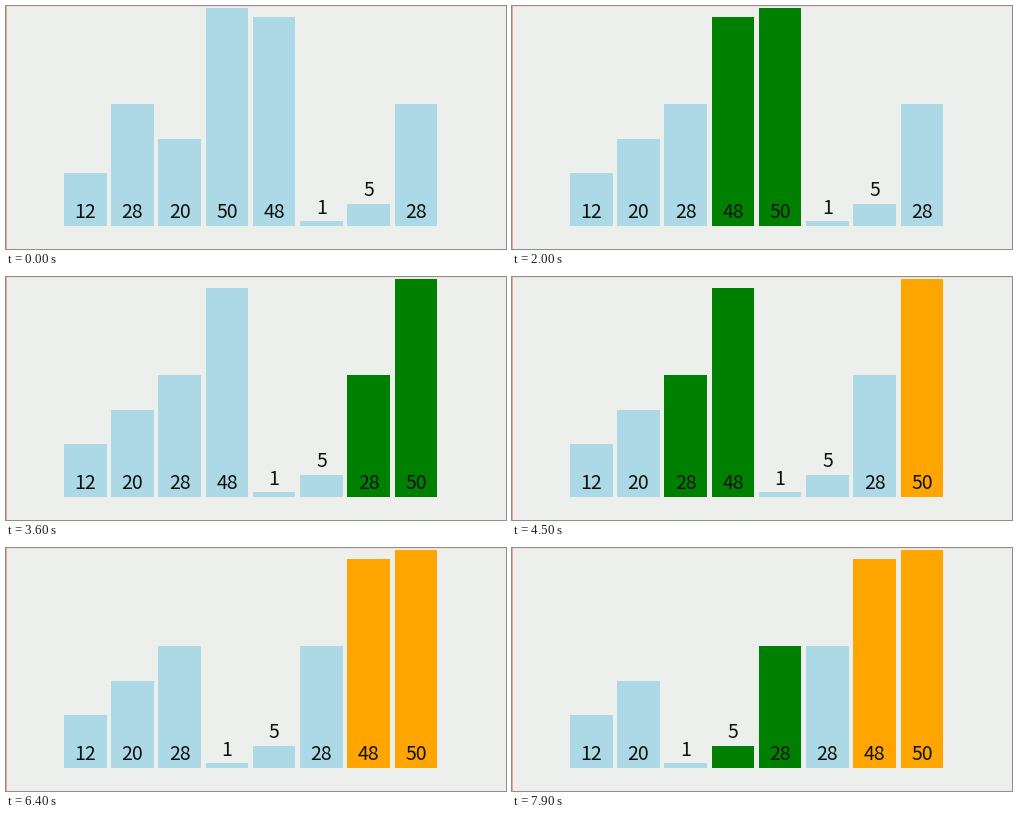
Animation, 500 px wide and 243 px high, one loop 8 s. Source, as a matplotlib script:

```python
import numpy as np
import matplotlib.pyplot as plt
from matplotlib.animation import FuncAnimation
from matplotlib.patches import Rectangle

W, H, DPI = 500, 243, 100
FRAMES, STEP = 80, 100
VALUES = [12, 28, 20, 50, 48, 1, 5, 28]
N = len(VALUES)

# Bar layout in pixels
LEFT, PITCH, BAR_W, BASE, UNIT = 58, 47.23, 42.5, 219.5, 4.35
BLUE, GREEN, ORANGE = "#add8e6", "#008000", "#ffa500"

# Sort timing in ms
START, COMPARE, SWAP, LEAD, MOVE, GAP = 385, 280, 560, 20, 200, 100


def bezier(p, q):
    s = np.linspace(0, 1, 200)
    return 3 * s * (1 - s) ** 2 * p + 3 * s ** 2 * (1 - s) * q + s ** 3


EASE_X, EASE_Y = bezier(0.25, 0.25), bezier(0.1, 1.0)


def ease(u):
    return np.interp(u, EASE_X, EASE_Y)


def bubble_sort():
    """List the steps as (start, order, left slot of the pair, swaps, sorted count)."""
    order = list(range(N))
    steps = [(0, order[:], None, False, 0)]
    t = START
    for done in range(N - 1):
        for j in range(N - 1 - done):
            swaps = VALUES[order[j]] > VALUES[order[j + 1]]
            steps.append((t, order[:], j, swaps, done))
            if swaps:
                order[j], order[j + 1] = order[j + 1], order[j]
            t += SWAP if swaps else COMPARE
        steps.append((t, order[:], None, False, done + 1))
        t += GAP
    return steps


STEPS = bubble_sort()

fig = plt.figure(figsize=(W / DPI, H / DPI), dpi=DPI, facecolor="#ecefec")
ax = fig.add_axes([0, 0, 1, 1])
ax.set_xlim(0, W)
ax.set_ylim(H, 0)
ax.axis("off")

ax.add_patch(Rectangle((0, 0), W, 1, color="#f3dcd8", lw=0))
ax.add_patch(Rectangle((0, 0), 1, H, color="#e9a593", lw=0))

bars, labels = [], []
for v in VALUES:
    h = v * UNIT
    bars.append(ax.add_patch(Rectangle((0, BASE - h), BAR_W, h, lw=0)))
    mid = 205 if h > 30 else BASE - h - 14.5
    labels.append(ax.text(0, mid + 7, str(v), ha="center", va="baseline",
                          family="Noto Sans CJK JP", size=19.5 * 72 / DPI,
                          color="#0c1210"))


def draw(frame):
    t = frame * STEP
    start, order, pair, swaps, done = [s for s in STEPS if s[0] <= t][-1]
    shift = ease(np.clip((t - start - LEAD) / MOVE, 0, 1)) if swaps else 0
    for slot, k in enumerate(order):
        pos, color = slot, ORANGE if slot >= N - done else BLUE
        if pair is not None and slot in (pair, pair + 1):
            color = GREEN
            pos += shift if slot == pair else -shift
        x = LEFT + pos * PITCH
        bars[k].set(x=x, facecolor=color, zorder=2 + 2 * slot)
        labels[k].set(x=x + BAR_W / 2, zorder=3 + 2 * slot)
    return bars + labels


anim = FuncAnimation(fig, draw, frames=FRAMES, interval=STEP,
                     repeat=True, repeat_delay=0, blit=False)
plt.show()
```
